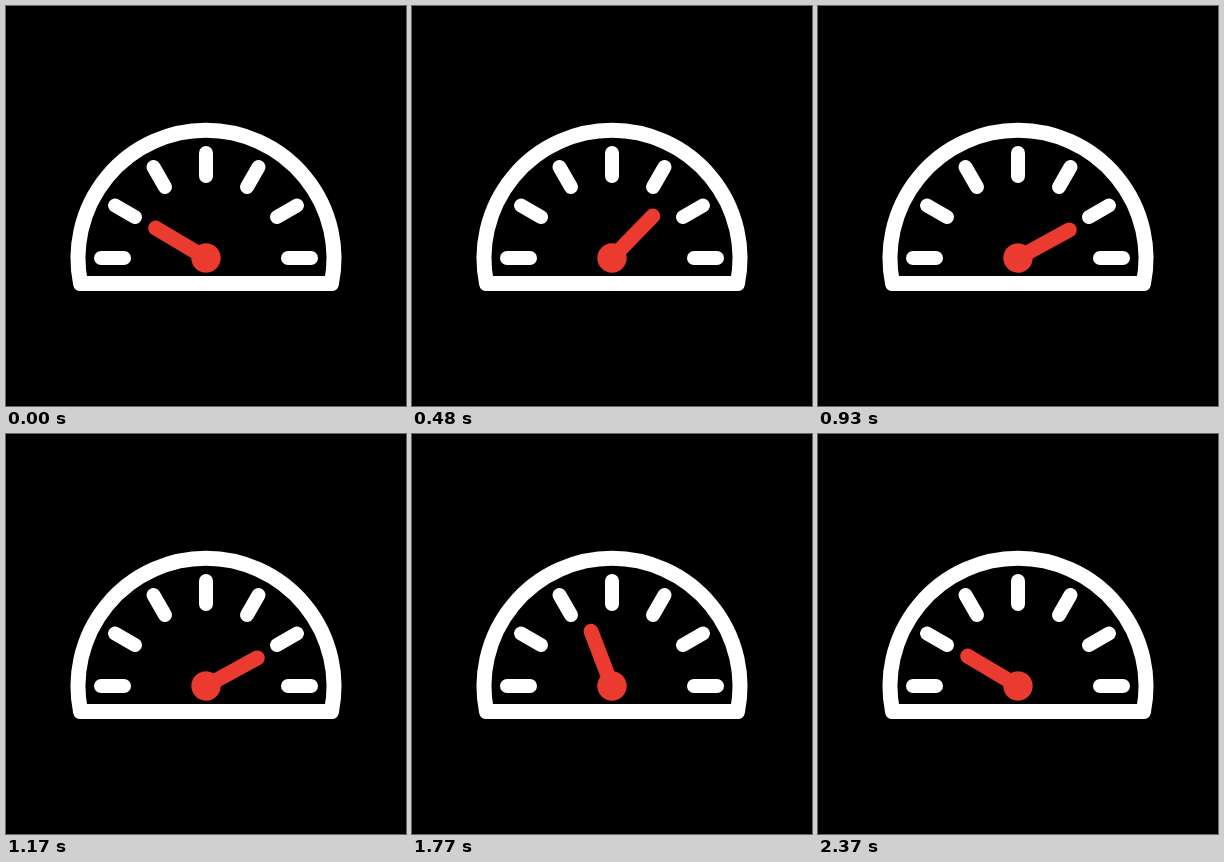
An HTML page for the animation above (2900 ms loop, 400 by 400 pixels).

```html
<!DOCTYPE html>
<html lang="en">
<head>
<meta charset="utf-8">
<title>Gauge</title>
<style>
  html, body { margin: 0; width: 100%; height: 100%; overflow: hidden; background: #000; }
  svg { display: block; width: 100%; height: 100%; }
</style>
</head>
<body>
<svg viewBox="0 0 400 400">
  <g fill="none" stroke="#fff" stroke-linecap="round" stroke-linejoin="round">
    <path d="M74.5 277.5A128 128 0 1 1 325.5 277.5Z" stroke-width="15"/>
    <g id="ticks" stroke-width="14"></g>
  </g>
  <g id="needle" fill="#eb3a30" stroke="#eb3a30">
    <path d="M200 252V193.5" stroke-width="15" stroke-linecap="round"/>
    <circle cx="200" cy="252" r="14.7" stroke="none"/>
  </g>
</svg>
<script>
const LOOP = 2900, STEP = 30;
const LOW = -59.3, HIGH = 61.3;
const needle = document.getElementById('needle');
const ticks = document.getElementById('ticks');

for (let a = -90; a <= 90; a += 30) {
  const tick = document.createElementNS('http://www.w3.org/2000/svg', 'path');
  tick.setAttribute('d', 'M200 170V147');
  tick.setAttribute('transform', `rotate(${a} 200 252)`);
  ticks.appendChild(tick);
}

// Cubic easing with flat ends; x1 and x2 are the handle positions in time.
function ease(u, x1, x2) {
  if (u <= 0) return 0;
  if (u >= 1) return 1;
  let lo = 0, hi = 1;
  for (let i = 0; i < 24; i++) {
    const m = (lo + hi) / 2, n = 1 - m;
    const x = 3 * n * n * m * x1 + 3 * n * m * m * x2 + m * m * m;
    if (x < u) lo = m; else hi = m;
  }
  return lo * lo * (3 - 2 * lo);
}

function angleAt(t) {
  const rise = ease(t / 650, 0.42, 0.58);
  const fall = ease((t - 1170) / 1200, 0.49, 0.29);
  return LOW + (HIGH - LOW) * (rise - fall);
}

function draw(ms) {
  const t = Math.floor((ms % LOOP) / STEP) * STEP;
  needle.setAttribute('transform', `rotate(${angleAt(t).toFixed(3)} 200 252)`);
}

const start = performance.now();
function tick() {
  draw(performance.now() - start);
  requestAnimationFrame(tick);
}
tick();
</script>
</body>
</html>
```
